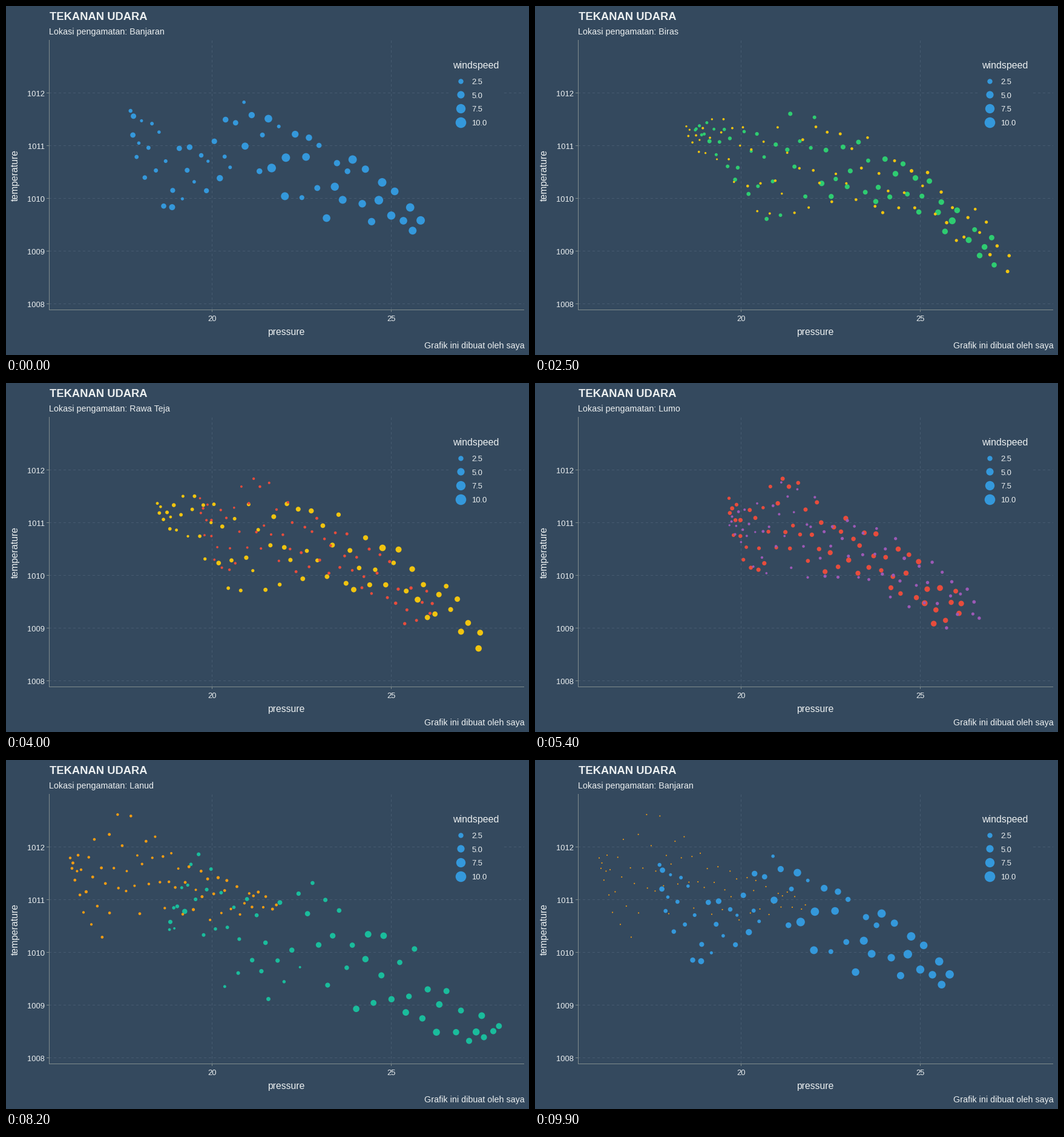
Write a matplotlib script that moves like this. It is 864x576 px and loops after 10000 ms.

```python
import numpy as np
import matplotlib.pyplot as plt
from matplotlib.animation import FuncAnimation
from matplotlib.patches import Rectangle

W, H, DPI = 864, 576, 72          # at 72 dpi one point is one pixel
FRAMES, INTERVAL = 100, 100
STARTS = [8, 23, 38, 52, 66, 80, 94]
STEPS = 7
MIN_R = 1.0
GOLDEN = (5 ** 0.5 - 1) / 2
BG, INK, GRID, AXIS = "#34495E", "#ECF0F1", "#465A70", "#7F8C8D"
BLUE = "#3498DB"

plt.rcParams["font.family"] = "Liberation Sans"


def station(seed, name, color, count, radii, spread, xs, tops, bottoms):
    """Scatter dots evenly in a band, denser to the left, larger to the right."""
    rng = np.random.RandomState(seed)
    i = np.arange(count)
    t = ((i + rng.uniform(0, 1, count)) / count) ** 1.3
    x = xs[0] + t * (xs[-1] - xs[0])
    v = (i * GOLDEN + rng.uniform(-0.12, 0.12, count)) % 1
    top, bottom = np.interp(x, xs, tops), np.interp(x, xs, bottoms)
    r = np.interp(t, [0, 0.8], radii) + rng.normal(0, spread, count)
    return name, color, np.column_stack([x, top + v * (bottom - top)]), np.clip(r, 2.4, 8)


stations = [
    station(1, "Banjaran", BLUE, 62, (3.1, 6.2), 1.1,
            (205, 246, 300, 400, 560, 691),
            (170, 190, 212, 150, 245, 325), (225, 362, 317, 300, 376, 372)),
    station(2, "Biras", "#2ECC71", 64, (3.4, 6.2), 0.4,
            (264, 333, 390, 450, 640, 767),
            (196, 173, 195, 155, 265, 383), (204, 300, 367, 318, 347, 435)),
    station(3, "Rawa Teja", "#F1C40F", 70, (3.3, 6.2), 0.6,
            (249, 330, 400, 520, 657, 791),
            (198, 163, 180, 185, 278, 385), (220, 300, 381, 333, 365, 445)),
    station(4, "Lumo", "#E74C3C", 68, (4, 5.8), 0.4,
            (319, 350, 400, 530, 660, 711),
            (189, 195, 140, 215, 300, 355), (225, 327, 300, 320, 401, 380)),
    station(5, "UKZ", "#9B59B6", 72, (4, 6.3), 0.5,
            (321, 365, 410, 540, 680, 740),
            (210, 200, 150, 215, 288, 368), (235, 346, 320, 325, 421, 385)),
    station(6, "Lanud", "#1ABC9C", 66, (3.4, 7.2), 0.9,
            (268, 318, 380, 500, 690, 820),
            (245, 140, 225, 180, 320, 440), (280, 300, 406, 381, 460, 470)),
    station(7, "Lereng", "#F39C12", 68, (5, 5), 0.6,
            (106, 140, 190, 240, 350, 447),
            (160, 135, 80, 110, 188, 230), (180, 318, 270, 250, 272, 250)),
]

fig = plt.figure(figsize=(W / DPI, H / DPI), dpi=DPI, facecolor=BG)
ax = fig.add_axes([0, 0, 1, 1])
ax.set(xlim=(0, W), ylim=(H, 0))
ax.axis("off")


def label(x, y, s, size, ha="left", **kw):
    return ax.text(x, y, s, fontsize=size, color=INK, ha=ha, va="baseline", **kw)


def line(x0, y0, x1, y1, color, z=1, **kw):
    ax.plot([x0, x1], [y0, y1], color=color, lw=1, zorder=z, snap=False,
            solid_capstyle="butt", **kw)


def area(r):
    return (2 * np.asarray(r)) ** 2


# panel
for k in range(5):
    y = round(143 + 86.9 * k) + 0.5
    line(71, y, 856, y, GRID, dashes=(4, 4))
    line(67, y, 71, y, AXIS)
    label(64, y + 5.3, str(1012 - k), 12.9, "right")
for x, s in ((340.5, "20"), (636.5, "25")):
    line(x, 501, x, 56, GRID, dashes=(4, 4))
    line(x, 501, x, 505, AXIS)
    label(x, 520, s, 12.9, "center")
line(71.5, 56, 71.5, 502, AXIS, 2)
line(71, 501.5, 856, 501.5, AXIS, 2)

label(72, 22.8, "TEKANAN UDARA", 18.4, weight="bold")
subtitle = label(71, 47, "", 14.2)
label(462.5, 543.5, "pressure", 15.8, "center")
ax.text(23, 279.5, "temperature", fontsize=15.8, color=INK, rotation=90,
        ha="right", va="center")
label(856.5, 565, "Grafik ini dibuat oleh saya", 14.2, "right")

# legend
ax.add_patch(Rectangle((734, 86), 86, 121, color=BG, lw=0, zorder=4))
label(738.5, 103, "windspeed", 16, zorder=6)
for k, (s, r) in enumerate((("2.5", 4.2), ("5.0", 6.1), ("7.5", 7.7), ("10.0", 8.8))):
    y = 123.5 + 22.9 * k
    ax.scatter([751.3], [y], s=area(r), c=BLUE, lw=0, zorder=6, snap=False)
    label(769.5, y + 5.2, s, 13, zorder=6)

leaving = ax.scatter([], [], lw=0, zorder=3, snap=False)
showing = ax.scatter([], [], lw=0, zorder=3.5, snap=False)


def ease(p):
    return 4 * p ** 3 if p < 0.5 else 1 - 4 * (1 - p) ** 3


def place(dots, st, grow):
    _, color, xy, r = st
    dots.set_offsets(xy)
    dots.set_sizes(area(MIN_R + (r - MIN_R) * grow))
    dots.set_facecolor(color)


def update(i):
    j, p = -1, 1.0
    for n, start in enumerate(STARTS):
        if i >= start:
            j, p = n, min(1, (i - start + 1) / STEPS)
    old, new = stations[j], stations[(j + 1) % len(stations)]
    e = ease(p)
    place(leaving, old, 1 - e)
    leaving.set_visible(p < 1)
    place(showing, new, e)
    subtitle.set_text("Lokasi pengamatan: " + (new if p > 0.5 else old)[0])
    return leaving, showing, subtitle


anim = FuncAnimation(fig, update, frames=FRAMES, interval=INTERVAL,
                     repeat=True, repeat_delay=0, blit=False)
plt.show()
```
